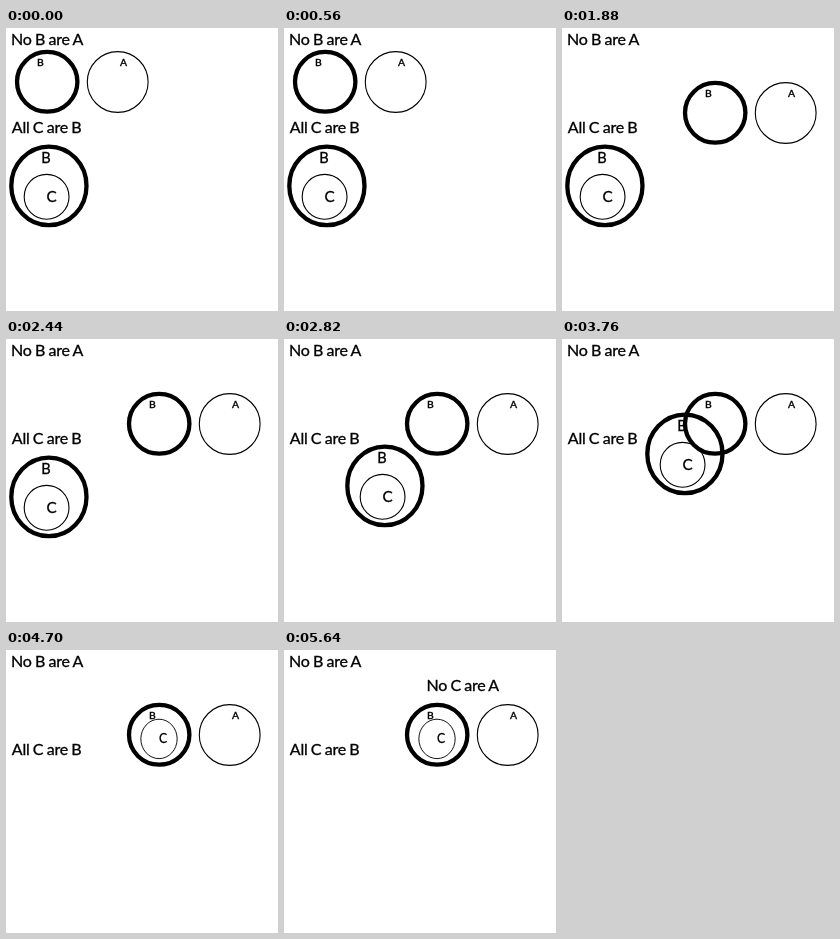
Recreate the animation shown at these times as an HTML page. Size 272 px wide and 283 px high, loop 6.58 s.

```html
<!DOCTYPE html>
<html lang="en">
<head>
<meta charset="utf-8">
<title>Syllogism circles</title>
<style>
  html, body { margin: 0; width: 100%; height: 100%; overflow: hidden; background: #fff; }
  svg { display: block; width: 100%; height: 100%; }
  text { font-family: Lato, "Open Sans", sans-serif; font-size: 16px; stroke: #000; stroke-width: .3px; }
  .line { letter-spacing: -.2px; word-spacing: -.6px; }
  .mid { text-anchor: middle; }
  .small { font-size: 10.4px; font-weight: 500; }
  .ring { fill: none; stroke: #000; stroke-width: 1.1px; }
  .thick { stroke-width: 4.3px; }
</style>
</head>
<body>
<svg viewBox="0 0 272 283">
  <text class="line" x="5" y="17">No B are A</text>
  <text class="line" x="5.8" y="105">All C are B</text>
  <text class="line" id="result" x="142.6" y="41">No C are A</text>

  <g id="pair">
    <ellipse class="ring thick" cx="41.2" cy="53.8" rx="30.2" ry="29.9"/>
    <text class="mid small" x="34.4" y="38.4">B</text>
    <circle class="ring" cx="111.7" cy="54" r="30.4"/>
    <text class="mid small" x="117.5" y="38.4">A</text>
  </g>

  <g id="outer">
    <ellipse class="ring thick" cx="42.9" cy="157.9" rx="37.6" ry="39.3"/>
    <text class="mid" x="40" y="135" style="font-size:14.6px">B</text>
  </g>

  <g id="inner">
    <circle class="ring" r="22.4"/>
    <text class="mid" x="5" y="4.8" style="font-size:15.2px">C</text>
  </g>
</svg>
<script>
  const STEP = 940, COUNT = 7;
  // Offsets of each group per step; the last entry holds.
  const pairPath = [[0, 0], [46, 7], [112, 31]];
  const nestPath = [[0, 0], [0, 0], [0, 0], [58, -11], [80, -43]];
  const home = [40.6, 168.8];

  const el = id => document.getElementById(id);
  const at = (path, i) => path[Math.min(i, path.length - 1)];
  const place = (id, x, y, sx = 1, sy = 1) =>
    el(id).setAttribute("transform", `translate(${x} ${y}) scale(${sx} ${sy})`);
  const show = (id, on) => el(id).setAttribute("visibility", on ? "visible" : "hidden");

  function draw(ms) {
    const i = Math.floor(ms / STEP) % COUNT;
    const merged = i >= 5;
    const [nx, ny] = at(nestPath, i);

    place("pair", ...at(pairPath, i));
    place("outer", nx, ny);
    show("outer", !merged);
    if (merged) place("inner", 153, 88.9, 0.81, 0.88);
    else place("inner", home[0] + nx, home[1] + ny);
    show("result", i === 6);
  }

  const start = performance.now();
  function tick() {
    draw(performance.now() - start);
    requestAnimationFrame(tick);
  }
  tick();
</script>
</body>
</html>
```
